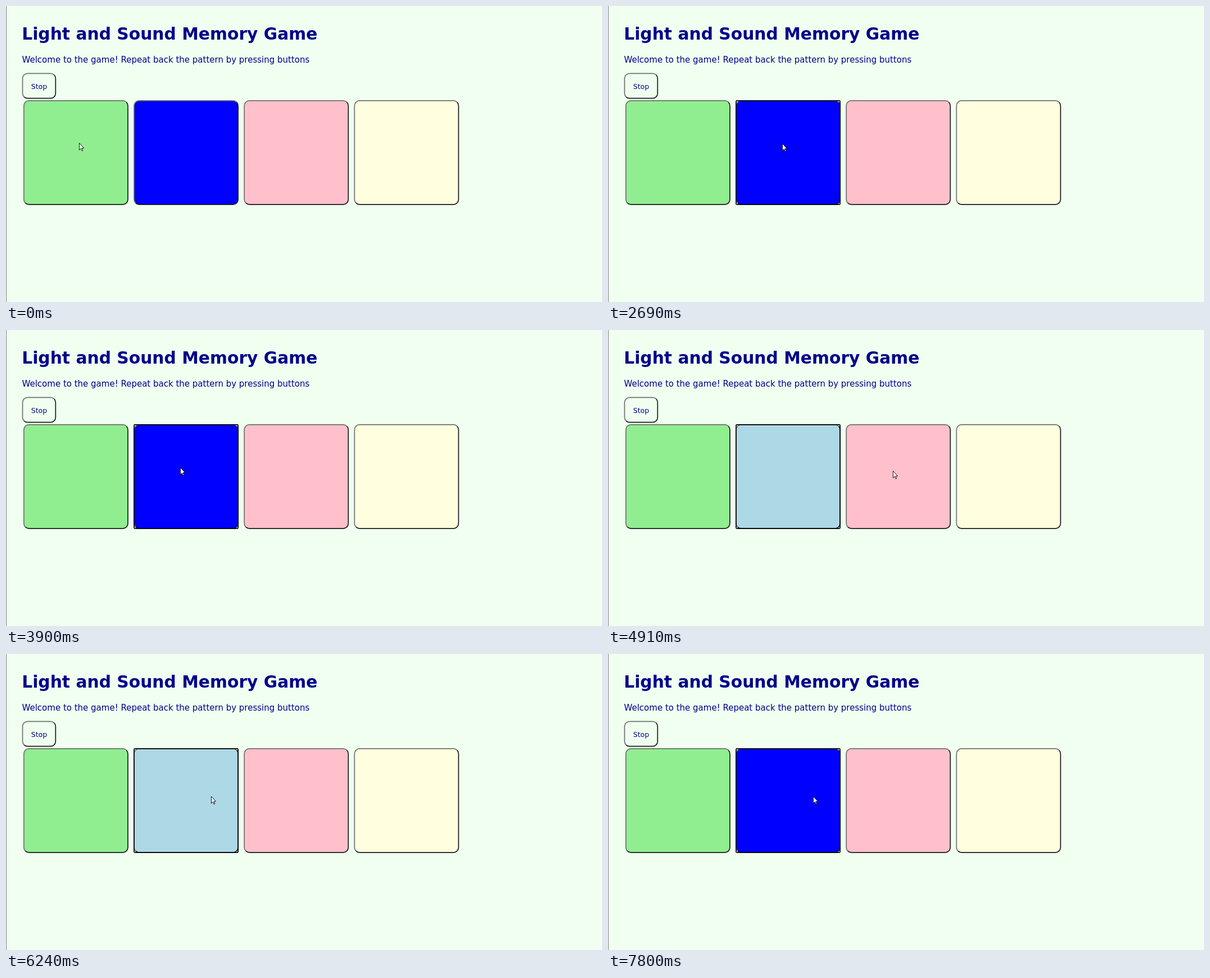
Recreate the animation shown at these times as an HTML page. Size 1061 px wide and 528 px high, loop 8000 ms.

```html
<!DOCTYPE html>
<html lang="en">
<head>
<meta charset="utf-8">
<title>Light and Sound Memory Game</title>
<style>
  html, body { margin: 0; width: 100%; height: 100%; overflow: hidden; background: #f0fff0; }
  svg { display: block; }
  text { font-family: Verdana, "DejaVu Sans", sans-serif; fill: #00008b; }
  .edge { fill: none; stroke-width: 1.7; }
</style>
</head>
<body>
<svg width="1061" height="528" viewBox="0 0 1061 528">
  <rect width="1061" height="528" fill="#f0fff0"/>
  <rect width="1" height="528" fill="#808080"/>
  <text x="28.2" y="60" font-size="29.75" font-weight="bold">Light and Sound Memory Game</text>
  <text x="28.5" y="101" font-size="15">Welcome to the game! Repeat back the pattern by pressing buttons</text>
  <g id="buttons"></g>
  <text x="59" y="147.7" font-size="12.5" text-anchor="middle">Stop</text>
  <rect id="focus" class="edge" x="228" y="168.9" width="185.2" height="185.2" rx="1.5" stroke="#000"/>
  <path id="pointer" d="M.5 .5V12.9L3.3 10.2 5.2 14.5 6.9 13.8 5 9.5H8.7Z" fill="#fff" stroke="#000" stroke-width=".9"/>
</svg>
<script>
const LOOP = 8000;
const RADIUS = 9;
const $ = id => document.getElementById(id);

// A rounded button with a light top-left edge and a dark bottom-right edge.
function addButton(x, y, w, h, fill) {
  const r = RADIUS, k = r * (1 - Math.SQRT1_2);
  const right = x + w, bottom = y + h;
  const arc = (px, py) => `A${r} ${r} 0 0 1 ${px} ${py}`;
  const bottomLeft = `${x + k} ${bottom - k}`, topRight = `${right - k} ${y + k}`;
  const light = `M${bottomLeft}${arc(x, bottom - r)}V${y + r}${arc(x + r, y)}H${right - r}${arc(right - k, y + k)}`;
  const dark = `M${topRight}${arc(right, y + r)}V${bottom - r}${arc(right - r, bottom)}H${x + r}${arc(x + k, bottom - k)}`;
  $("buttons").insertAdjacentHTML("beforeend", `<g>
    <rect x="${x}" y="${y}" width="${w}" height="${h}" rx="${r}" fill="${fill}"/>
    <path class="edge" d="${light}" stroke="#707070"/>
    <path class="edge" d="${dark}" stroke="#1a1a1a"/></g>`);
  return $("buttons").lastElementChild.firstElementChild;
}

addButton(29.5, 120.3, 58.8, 44.4, "#f0fff0");
const tiles = ["#90ee90", "#add8e6", "#ffc0cb", "#ffffe0"]
  .map((color, i) => addButton(31.8 + 196.2 * i, 168.9, 185.2, 185.2, color));

// Pointer stops: [start time, x, y], each held until the next.
const stops = [
  [0, 130, 244], [150, 158, 245], [270, 199, 246], [420, 274, 246],
  [570, 302, 246], [690, 310, 245],
  [4660, 335, 247], [4790, 440, 250], [4910, 507, 251],
  [5220, 474, 252], [5370, 365, 253.5]
];
const litSpans = [[0, 810], [2690, 2940], [3900, 4910], [5220, 6240], [6510, 6810], [7800, LOOP]];
const focusStart = 2690;

function draw(now) {
  const t = now % LOOP;
  const lit = litSpans.some(([from, to]) => t >= from && t < to);
  const [, x, y] = stops.findLast(([start]) => start <= t);
  tiles[1].setAttribute("fill", lit ? "#0000ff" : "#add8e6");
  $("focus").setAttribute("visibility", t >= focusStart ? "visible" : "hidden");
  $("pointer").setAttribute("transform", `translate(${x} ${y})`);
}

const begin = performance.now();
function tick() {
  draw(performance.now() - begin);
  requestAnimationFrame(tick);
}
tick();
</script>
</body>
</html>
```
